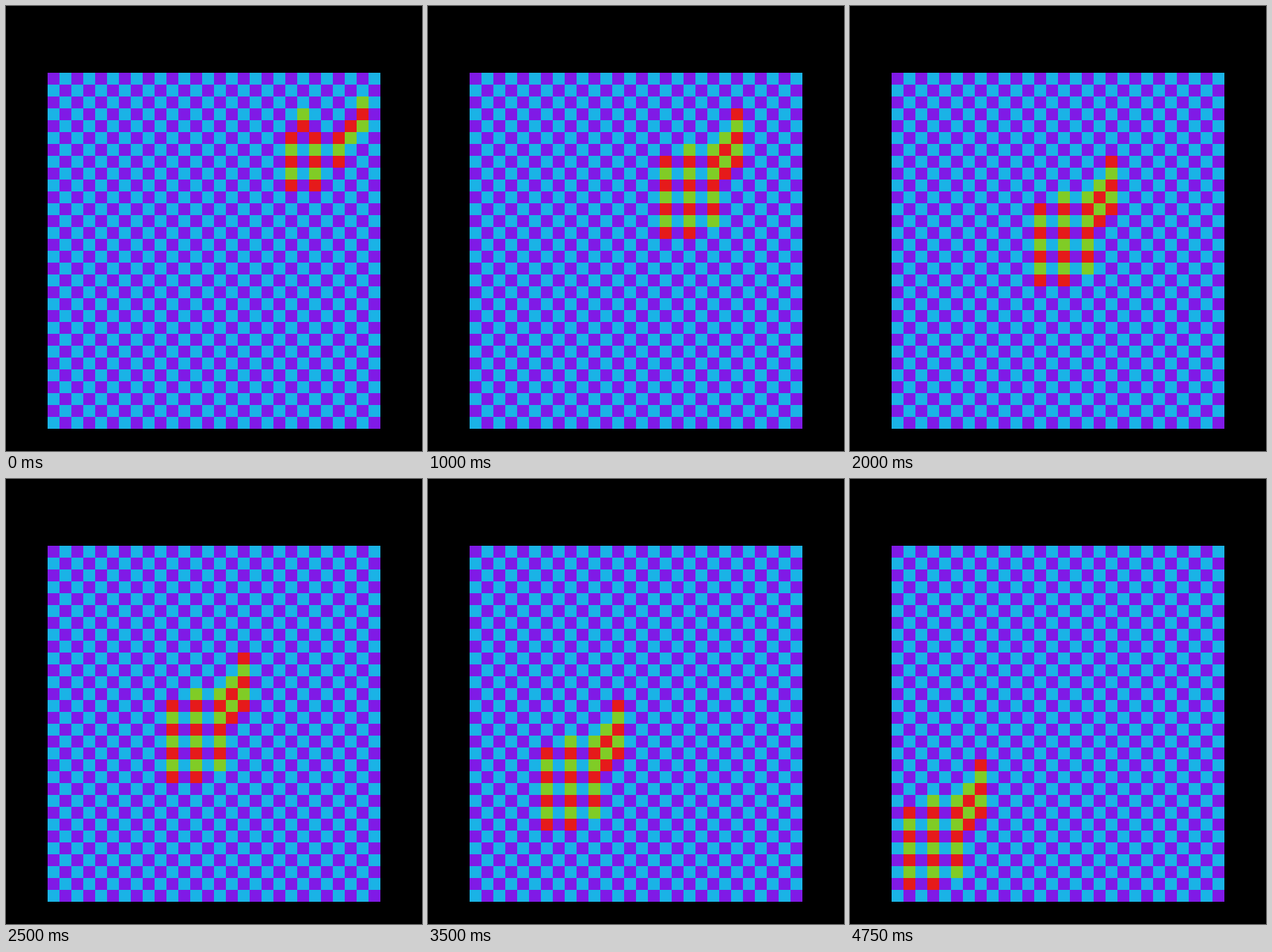
These frames come from a looping animation (560x600 px, 5000 ms). An HTML page with a canvas:

```html
<!DOCTYPE html>
<html lang="en">
<head>
<meta charset="utf-8">
<title>Checkerboard drift</title>
<style>
  html, body { margin: 0; width: 100%; height: 100%; overflow: hidden; background: #000; }
  canvas { display: block; }
</style>
</head>
<body>
<canvas id="stage" width="560" height="600"></canvas>
<script>
const ctx = document.getElementById('stage').getContext('2d');
const CELL = 16, COLS = 28, ROWS = 30, LEFT = 56, TOP = 90;
const STEP_MS = 250, STEPS = 20;
const LEG_COL = 20, SHOULDER = 5, FOOT = 9;
const BOARD = ['#801ae6', '#1ab3e6'];
const FIGURE = ['#80cc26', '#e61a1a'];

function fillCell(col, row, colors) {
  ctx.fillStyle = colors[(col + row) % 2];
  ctx.fillRect(LEFT + col * CELL, TOP + row * CELL, CELL, CELL);
}

function drawBoard() {
  for (let row = 0; row < ROWS; row++)
    for (let col = 0; col < COLS; col++) fillCell(col, row, BOARD);
}

// The figure moves one cell left and down per step, stretching upward at first.
function drawFigure(step) {
  const growth = Math.min(step / 2, 1);
  const lift = Math.floor(3 * growth);
  const settle = Math.round(growth);
  const bar = (col, first, last) => {
    for (let row = first; row <= last; row++) fillCell(col - step, row + step, FIGURE);
  };

  // Two legs joined by a peak that shrinks away.
  bar(LEG_COL, SHOULDER - Math.floor(2 * growth), FOOT);
  bar(LEG_COL + 1, SHOULDER - 2, SHOULDER - 1 - 2 * growth);
  bar(LEG_COL + 2, SHOULDER - lift, FOOT);

  // A third leg, with an arm curving up from it.
  bar(LEG_COL + 4, SHOULDER - lift, FOOT - 2 + settle);
  for (let i = 1; i <= 2; i++)
    bar(LEG_COL + 4 + i, SHOULDER - lift - i * (i + 1) / 2, SHOULDER + 1 - i - settle);
}

function draw(step) {
  drawBoard();
  drawFigure(step);
}

let shown = 0;
const startTime = performance.now();
function tick() {
  const step = Math.floor((performance.now() - startTime) / STEP_MS) % STEPS;
  if (step !== shown) draw(shown = step);
  requestAnimationFrame(tick);
}
draw(shown);
requestAnimationFrame(tick);
</script>
</body>
</html>
```
